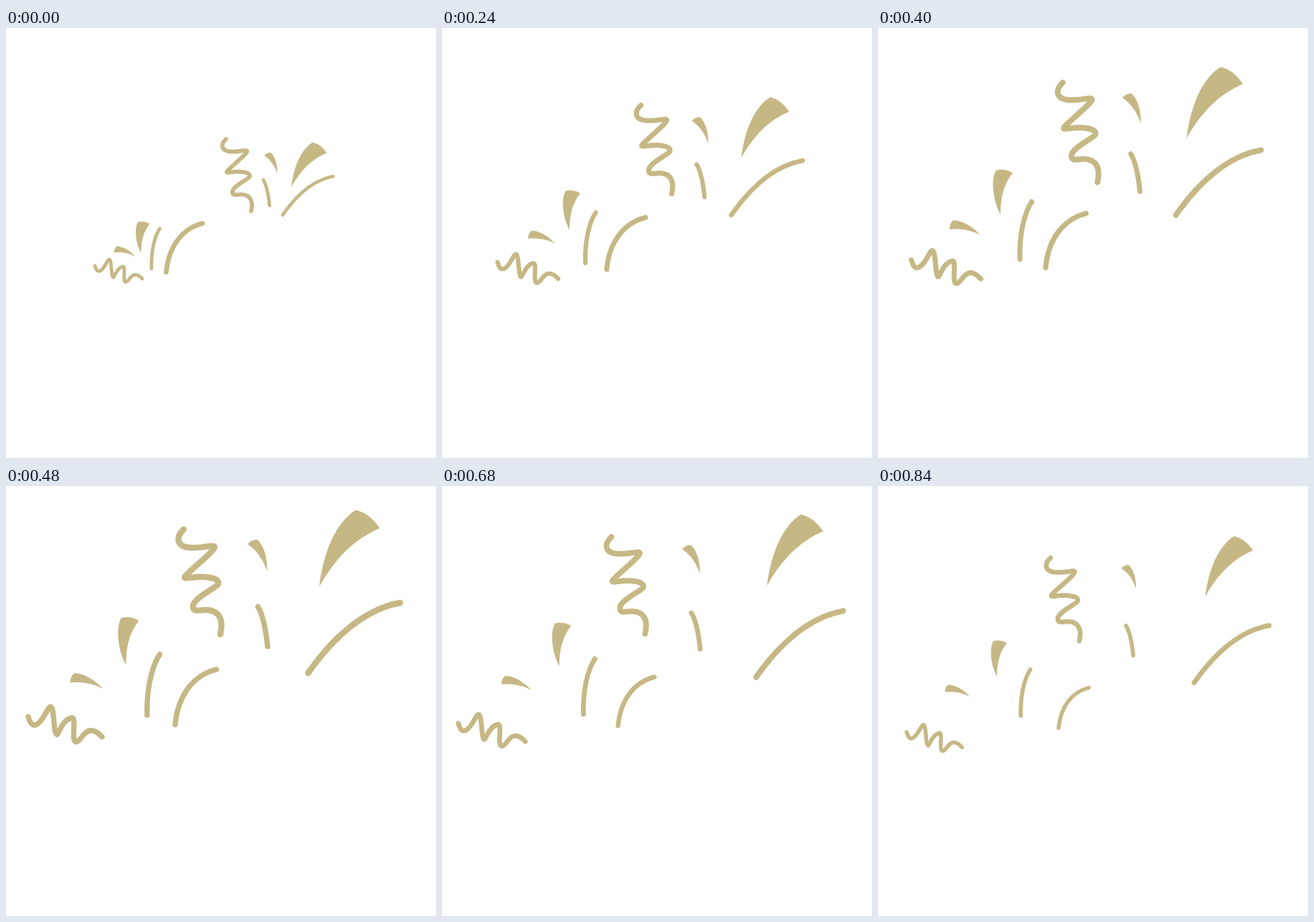
Write an HTML page that moves like this. It is 600 px wide and 600 px high and loops after 1.08 s.

```html
<!DOCTYPE html>
<html lang="en">
<head>
<meta charset="utf-8">
<title>Confetti burst</title>
<style>
  html, body { margin: 0; width: 100%; height: 100%; overflow: hidden; background: #fff; }
  svg { display: block; width: 100%; height: 100%; }
  path { fill: none; stroke: #c6b885; stroke-linecap: round; stroke-linejoin: round; }
  .leaf { fill: #c6b885; stroke: none; }
  .thin { stroke-width: 7.4px; }
  .thick { stroke-width: 8.4px; }
</style>
</head>
<body>
<svg id="stage" viewBox="0 0 600 600"></svg>
<script>
const LOOP = 1080, STEP = 20;
const REF = 480, PEAK = 540, END = 840;

// Outlines are drawn as they stand at REF.
// from and to: centre x, centre y and scale at the start and at the end.
const parts = [
  // right burst
  { kind: 'thick', from: [322.5, 205.3, .687], to: [258.5, 158.2, .79],
    d: 'M248 60.5C236 72 238 85 258 86S289 81 291 85S254 120 250 126S262 125 279 127S297 133 296 137S262 156 261 167S272 172 281 173C297 174 304 186 299 207' },
  { kind: 'leaf', from: [369.5, 188.5, .66], to: [349.8, 126.6, .745],
    d: 'M337 81Q343 74 351 75C360 84 365 100 364.5 119C358 101 349 89 337 81Z' },
  { kind: 'leaf', from: [422.7, 190.7, .585], to: [489.9, 112.2, .79],
    d: 'M437 140.5C443 92 460 51 488 33.5Q508 38 521.5 59C488 73 461 98 437 140.5Z' },
  { kind: 'thin', from: [363.4, 229.9, .645], to: [351.1, 215.8, .75],
    d: 'M351.5 168.5Q361 184 365 224' },
  { kind: 'thick', from: [421.3, 234, .55], to: [493.4, 234.6, .815],
    d: 'M421.5 261C455 213 499 172 550 163' },
  // left burst
  { kind: 'leaf', from: [165.8, 311.7, .663], to: [111, 285.6, .76],
    d: 'M89.5 274.5Q90 264 96 261C111 262 124 271 135.5 283C120 275 105 273 89.5 274.5Z' },
  { kind: 'leaf', from: [190.8, 292, .662], to: [168.7, 240.8, .76],
    d: 'M167.5 249.5C157 232 152 198 161 184Q174 181 185.5 188C174 202 167 222 167.5 249.5Z' },
  { kind: 'thin', from: [208.7, 307.8, .655], to: [205.8, 288.3, .76],
    d: 'M214.5 235C202 254 196 287 197 320' },
  { kind: 'thin', from: [249, 306.6, .885], to: [273, 309.6, .73],
    d: 'M293.5 256C262 264 240 291 236 333' },
  { kind: 'thin', from: [157.1, 338.7, .642], to: [78.6, 351.4, .75],
    d: 'M31 322C34 332 37 335 42 333C52 329 58 308 62 308C68 308 66 347 71 347C74 346 78 326 92 323.5C99 323 90 357 98 357C104 357 108 342 118 341Q126 341 134 350' }
];

const lerp = (a, b, u) => a + (b - a) * u;

// Leftover launch speed after the peak; a higher drag spends it sooner
const carry = (u, drag) => (END - PEAK) / REF * u * (1 - u) ** drag;
const DRAG = { x: 2, y: 4 };

function pose({ from, mid, to }, t) {
  if (t <= PEAK) return from.map((a, i) => lerp(a, mid[i], t / REF));
  const u = (t - PEAK) / (END - PEAK);
  const glide = [carry(u, DRAG.x), carry(u, DRAG.y), 0];
  return from.map((a, i) =>
    lerp(lerp(a, mid[i], PEAK / REF), to[i], u) + (mid[i] - a) * glide[i]);
}

const stage = document.getElementById('stage');
for (const p of parts) {
  p.el = document.createElementNS('http://www.w3.org/2000/svg', 'path');
  p.el.setAttribute('d', p.d);
  p.el.setAttribute('class', p.kind);
  stage.append(p.el);
  const box = p.el.getBBox();
  p.mid = [box.x + box.width / 2, box.y + box.height / 2, 1];
}

function draw(now) {
  const t = Math.min(Math.floor(now % LOOP / STEP) * STEP, END);
  for (const p of parts) {
    const [x, y, s] = pose(p, t);
    p.el.setAttribute('transform',
      `translate(${x} ${y}) scale(${s}) translate(${-p.mid[0]} ${-p.mid[1]})`);
  }
}

function tick() {
  draw(performance.now());
  requestAnimationFrame(tick);
}
draw(0);
requestAnimationFrame(tick);
</script>
</body>
</html>
```
